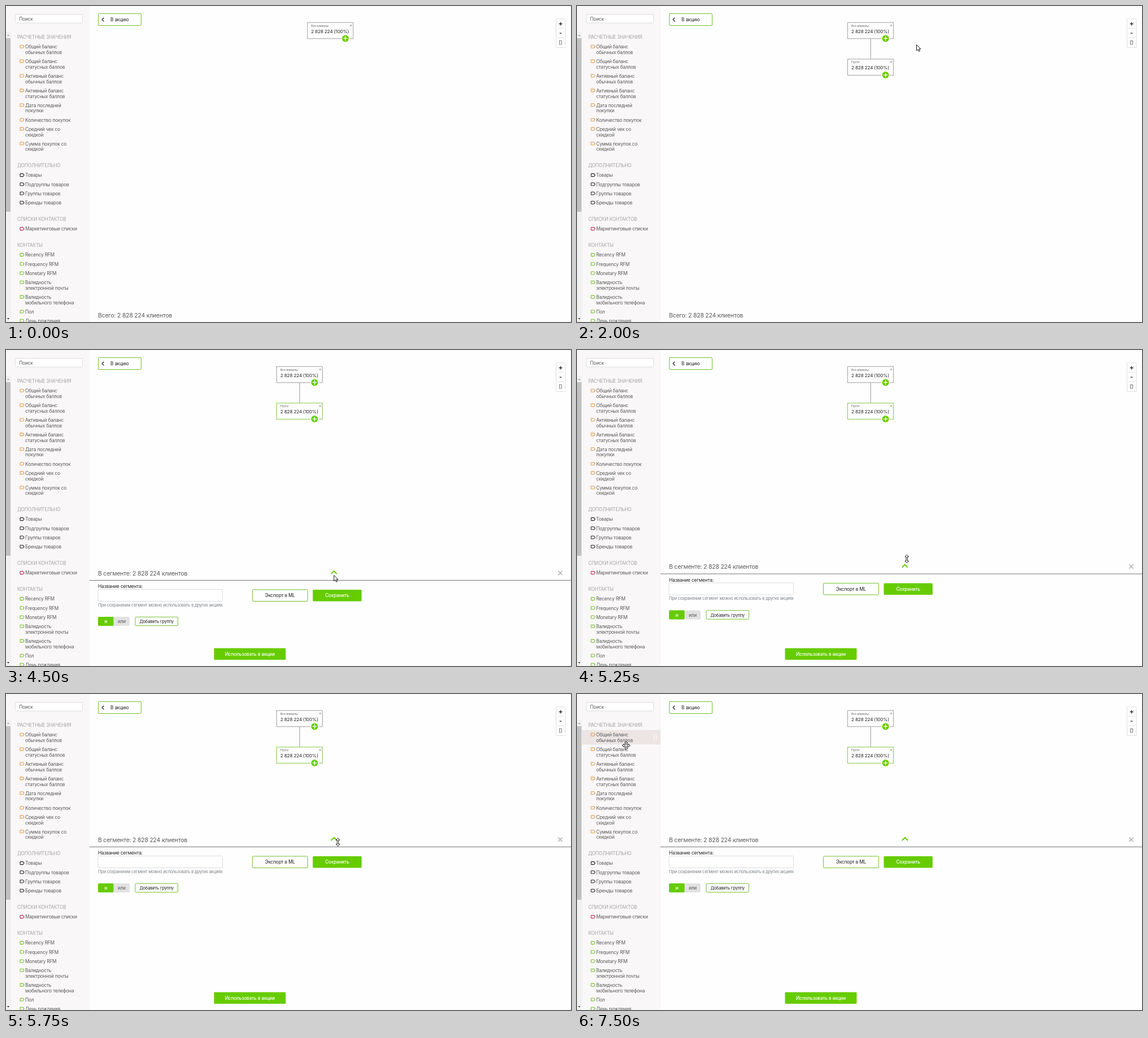
Write an HTML page that moves like this. It is 1001 by 559 pixels and loops after 8000 ms.

```html
<!DOCTYPE html>
<html lang="ru">
<head>
<meta charset="utf-8">
<title>Сегменты</title>
<style>
html, body { margin: 0; width: 100%; height: 100%; overflow: hidden; background: #fefefe; }
svg { display: block; width: 100%; height: 100%; }
text { font: 8.3px Inter, Roboto, sans-serif; letter-spacing: -.022em; fill: #5a5a5a; white-space: pre; }
.head { fill: #a4a4a4; }
.dark { fill: #222; }
.white { fill: #fff; font-weight: 500; }
.mid { text-anchor: middle; }
.line { fill: none; stroke-linecap: round; stroke-linejoin: round; }
.outline { fill: #fefefe; stroke: #74c22e; }
.solid { fill: #6c0; }
.cursor { fill: #fff; stroke: #000; stroke-width: .9; stroke-linejoin: round; }
</style>
</head>
<body>
<svg id="stage" viewBox="0 0 1001 559" preserveAspectRatio="none"></svg>
<script>
const stage = document.getElementById('stage');

function add(parent, tag, attrs = {}, content) {
  const el = document.createElementNS('http://www.w3.org/2000/svg', tag);
  for (const key in attrs) el.setAttribute(key, attrs[key]);
  if (content !== undefined) el.textContent = content;
  return parent.appendChild(el);
}
const group = (parent = stage) => add(parent, 'g');
const rect = (p, x, y, width, height, attrs) => add(p, 'rect', { x, y, width, height, ...attrs });
const path = (p, d, stroke, width = 1) =>
  add(p, 'path', { d, stroke, 'stroke-width': width, class: 'line' });
const label = (p, x, y, content, cls = '', size) =>
  add(p, 'text', { x, y, class: cls, ...(size && { style: `font-size:${size}px` }) }, content);
const cross = (p, x, y, r, stroke, width) =>
  path(p, `M${x - r} ${y - r}l${2 * r} ${2 * r}M${x - r} ${y + r}l${2 * r} ${-2 * r}`, stroke, width);
const show = (el, on) => el.style.display = on ? '' : 'none';
const move = (el, x, y) => el.setAttribute('transform', `translate(${x} ${y})`);

function button(p, x, y, w, h, content, solid, size) {
  rect(p, x, y, w, h, { rx: 1.5, class: solid ? 'solid' : 'outline' });
  label(p, x + w / 2, y + h / 2 + 3, content, solid ? 'white mid' : 'dark mid', size);
}

// Sidebar
const sections = [
  [55, 'РАСЧЕТНЫЕ ЗНАЧЕНИЯ', '#e69a45', ['Общий баланс|обычных баллов', 'Общий баланс|статусных баллов',
    'Активный баланс|обычных баллов', 'Активный баланс|статусных баллов', 'Дата последней|покупки',
    'Количество покупок', 'Средний чек со|скидкой', 'Сумма покупок со|скидкой']],
  [282.4, 'ДОПОЛНИТЕЛЬНО', '#222', ['Товары', 'Подгруппы товаров', 'Группы товаров', 'Бренды товаров']],
  [377.4, 'СПИСКИ КОНТАКТОВ', '#c02a5a', ['Маркетинговые списки']],
  [423.4, 'КОНТАКТЫ', '#70c220', ['Recency RFM', 'Frequency RFM', 'Monetary RFM',
    'Валидность|электронной почты', 'Валидность|мобильного телефона', 'Пол', 'День рождения']]
];

rect(stage, 0, 0, 148, 559, { fill: '#f9f7f7' });
const highlight = group();
rect(highlight, 9, 0, 139, 25.6, { fill: '#ece5e4' });
for (let i = 0; i < 6; i++)
  rect(highlight, 136 + i % 2 * 4, 7.5 + (i >> 1) * 4, 1.8, 1.8, { fill: '#fff' });

rect(stage, 0, 46, 8.5, 513, { fill: '#f1f1f1' });
rect(stage, 0, 57, 8, 307, { fill: '#c1c1c1' });
add(stage, 'path', { d: 'M1.8 53l2.2-2.5 2.2 2.5z', fill: '#a3a3a3' });
add(stage, 'path', { d: 'M1.8 552l2.2 2.5 2.2-2.5z', fill: '#444' });
rect(stage, 16.5, 15, 119, 15, { rx: 1.5, fill: '#fff', stroke: '#dcdcdc' });
label(stage, 23, 26, 'Поиск', '', 8.4);

for (const [top, title, color, items] of sections) {
  label(stage, 20, top + 3, title, 'head');
  let y = top + 16.8;
  for (const item of items) {
    const lines = item.split('|');
    path(stage, `M25.6 ${y - 2.6}h3.8q.7 0 1.1.5l1.5 2-1.5 2q-.4.5-1.1.5h-3.8q-.6 0-.6-.6v-3.8q0-.6.6-.6z`, color, 1.1);
    lines.forEach((line, i) => label(stage, 34, y + 3.2 + i * 9.8, line));
    y += lines.length > 1 ? 25.9 : 16.2;
  }
}

// Workspace
rect(stage, 163.5, 13.5, 76, 21, { rx: 1.5, class: 'outline' });
path(stage, 'M173 21l-3 3 3 3', '#222', 1.3);
label(stage, 185, 27.1, 'В акцию', 'dark');
label(stage, 163, 551.3, 'Всего: 2 828 224 клиентов', '', 10.5);

rect(stage, 974.5, 23, 16.5, 50.5, { rx: 2, fill: '#fff', stroke: '#ddd' });
path(stage, 'M978 39.8h10M978 56.2h10', '#ddd');
path(stage, 'M980.2 31.5h4.8M982.6 29.1v4.8M981.3 48.2h2.6', '#222', 1.3);
rect(stage, 980.5, 61.5, 4, 6.5, { fill: 'none', stroke: '#666', 'stroke-width': .8 });

function node(p, y, title) {
  const g = group(p);
  move(g, 0, y);
  const box = rect(g, .5, .5, 81, 28.5, { fill: '#fefefe', stroke: '#a0a0a0' });
  label(g, 7, 8, title, '', 5.2);
  label(g, 7, 18.9, '2 828 224 (100%)', 'dark', 8.2);
  cross(g, 77.5, 5.7, 1.2, '#555', .7);
  rect(g, 60, 27, 15.5, 4, { fill: '#fefefe' });
  add(g, 'circle', { cx: 67.7, cy: 28.7, r: 6, class: 'solid' });
  path(g, 'M64.3 28.7h6.8M67.7 25.3v6.8', '#fff', 1.4);
  return box;
}
const tree = group();
const branch = group(tree);
path(branch, 'M41.2 29V65', '#999');
const emptyBox = node(branch, 64.7, 'Пусто');
node(tree, 0, 'Все клиенты');

// Segment panel; y = 0 is its divider
const panel = group();
const panelBody = group(panel);
rect(panelBody, 148, -28, 853, 580, { fill: '#fefefe' });
path(panelBody, 'M148 0H1001', '#777');
label(panelBody, 163, -8.7, 'В сегменте: 2 828 224 клиентов', '', 10.5);
path(panelBody, 'M576.5 -12l4.5-4.5 4.5 4.5', '#6c0', 2);
cross(panelBody, 982, -13, 3.2, '#b0b0b0', 1.5);
label(panelBody, 163, 13.6, 'Название сегмента:', 'dark', 8.4);
rect(panelBody, 163, 16, 220.5, 21, { rx: 1.5, fill: '#fff', stroke: '#ddd' });
label(panelBody, 163, 46.3, 'При сохранении сегмент можно использовать в других акциях', '', 7.4)
  .style.fill = '#7b8288';
button(panelBody, 436.5, 16.5, 98, 20.5, 'Экспорт в ML');
button(panelBody, 543.5, 16.5, 86.5, 20.5, 'Сохранить', true);
rect(panelBody, 163, 64.5, 56, 16, { rx: 2, fill: '#e2e2e2' });
rect(panelBody, 163, 64.5, 27.5, 16, { rx: 2, class: 'solid' });
label(panelBody, 176.8, 75.5, 'и', 'white mid');
label(panelBody, 205, 75.5, 'или', 'mid');
button(panelBody, 229, 64.8, 75.5, 15.4, 'Добавить группу', false, 7.5);
button(panel, 368.5, 527.5, 127, 20.5, 'Использовать в акции', true);

// Cursors, each with its hotspot at 0,0
const cursor = group();
const arm = 'l2.6 2.6h-1.5v3.2';
const shapes = {
  arrow: 'M0 0v10.4l2.4-2.2 1.7 3.7 1.8-.8-1.7-3.6h3.3z',
  hand: 'M-1 0q1-1.4 2 0v4l4 1q1.3.4 1.2 2l-.7 4.5h-6L-4 7q0-1.5 1.4-1l1.6 1.4z',
  move: 'M0-7l2.7 2.8H1.2v3h3v-1.5L7 0 4.2 2.7V1.2h-3v3h1.5L0 7l-2.7-2.8h1.5v-3h-3v1.5L-7 0l2.8-2.7v1.5h3v-3h-1.5z',
  resize: 'M0-7.3l3.3 3.6H1.2v7.4h2.1L0 7.3l-3.3-3.6h2.1v-7.4h-2.1z'
};
const cursors = {};
for (const name in shapes) cursors[name] = add(cursor, 'path', { d: shapes[name], class: 'cursor' });

// [ms, x, y, shape]
const route = [
  [250, 661, 204, 'arrow'], [500, 643, 150, 'arrow'], [750, 615, 84, 'arrow'], [1000, 601, 57, 'hand'],
  [2000, 601.5, 68.5, 'arrow'], [2250, 583, 82, 'arrow'], [2500, 546, 103, 'move'], [2750, 522, 120, 'move'],
  [3000, 519, 116, 'move'], [3250, 519, 113.5, 'move'],
  [4000, 532, 180, 'arrow'], [4250, 566, 325, 'arrow'], [4500, 581, 398.5, 'arrow'],
  [4750, 583, 412, 'arrow'], [5000, 583.5, 408, 'resize'],
  [5250, 584.3, 369.5, 'resize'], [5500, 586, 306, 'resize'], [5750, 588, 262, 'resize'],
  [6250, 520, 245, 'arrow'], [6500, 350, 195, 'arrow'], [6750, 170, 130, 'arrow'],
  [7000, 90, 104, 'move'], [7500, 87, 91, 'move']
];
const divider = [[3500, 407.5], [5250, 396], [5500, 326], [5750, 270.5]];
const hovered = [[7000, 89.6], [7500, 63.8]];
const at = (track, t) => track.filter(key => key[0] <= t).pop();

function draw(t) {
  const split = t >= 1750;
  move(tree, split ? 479 : 533.6, 28.7);
  show(branch, split);

  const line = at(divider, t);
  show(panel, line);
  if (line) move(panelBody, 0, line[1]);
  emptyBox.setAttribute('stroke', line ? '#82c94a' : '#a0a0a0');

  const hover = at(hovered, t);
  show(highlight, hover);
  if (hover) move(highlight, 0, hover[1]);

  const stop = at(route, t);
  show(cursor, stop);
  if (stop) {
    move(cursor, stop[1], stop[2]);
    for (const name in cursors) show(cursors[name], name === stop[3]);
  }
}

const start = performance.now();
function tick() {
  draw((performance.now() - start) % 8000);
  requestAnimationFrame(tick);
}
tick();
</script>
</body>
</html>
```
